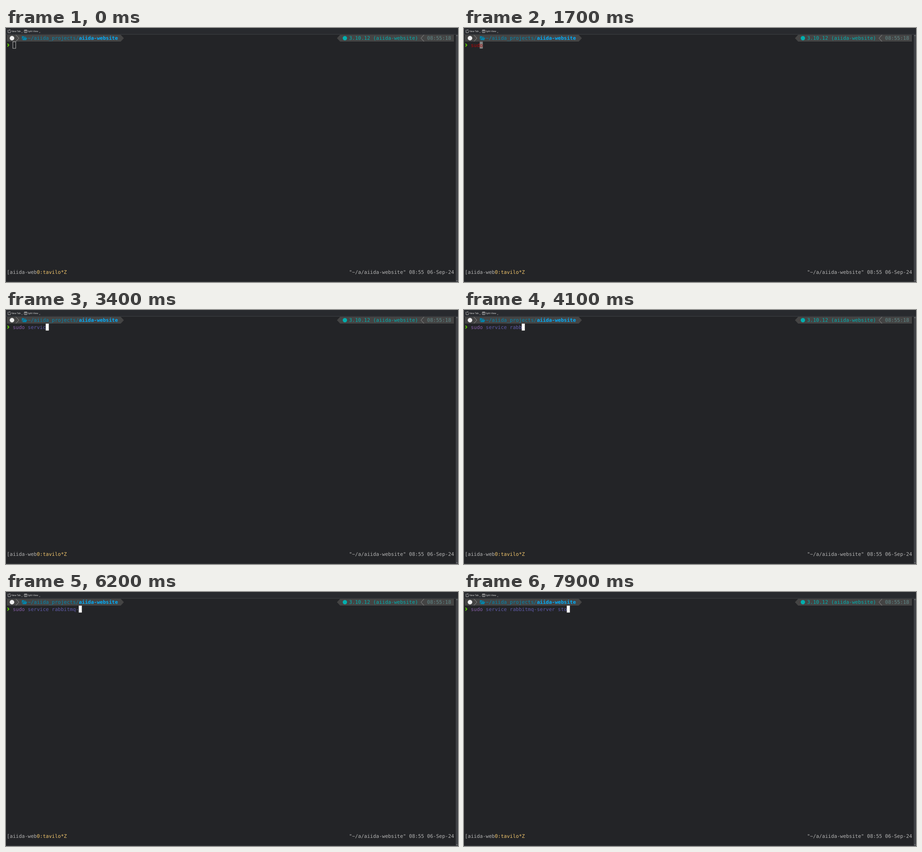
Animation, 997 px wide and 561 px high, one loop 8000 ms. Source, as an HTML page:

```html
<!DOCTYPE html>
<html lang="en">
<head>
<meta charset="utf-8">
<title>Terminal</title>
<style>
  html, body { margin: 0; width: 100%; height: 100%; overflow: hidden; background: #232427; }
  svg { display: block; width: 997px; height: 561px; }
  text { font: 11px "DejaVu Sans Mono", monospace; white-space: pre; text-rendering: geometricPrecision; }
  .menu { font: 5.1px "Noto Sans", sans-serif; fill: #dcdcdc; }
  .line { fill: none; stroke: #d0d0d0; stroke-width: .8; }
  .sep { fill: none; stroke: #949494; stroke-width: 1; }
</style>
</head>
<body>
<svg viewBox="0 0 997 561">
  <rect width="997" height="561" fill="#232427"/>

  <!-- toolbar -->
  <rect width="997" height="14" fill="#282a2e"/>
  <rect y="13.6" width="997" height=".9" fill="#424549"/>
  <path class="line" d="M6 4.4H4.4V10.4H9.6V6.4M7 4.4H9.6M8.3 3.2V5.8"/>
  <text class="menu" x="12" y="9.3">New Tab</text>
  <path class="line" stroke-width=".6" d="M34.3 9.6l1 .9 1-.9"/>
  <path class="line" d="M40.4 4.4H46.2V10.2H40.4ZM43.3 4.4V10.2M40.4 5.2H46.2"/>
  <text class="menu" x="48" y="9.3">Split View</text>
  <path class="line" stroke-width=".6" d="M73.3 9.6l1 .9 1-.9"/>

  <!-- scrollbar and lower edge -->
  <rect x="992" y="14.5" width="5" height="546.5" fill="#404246"/>
  <path class="line" d="M993.3 17.5l1.2-1.2 1.2 1.2M993.3 557.5l1.2 1.2 1.2-1.2"/>
  <rect y="560" width="992" height="1" fill="#393b3f"/>

  <!-- prompt bar -->
  <path fill="#444" d="M2 15H253L260 22.5 253 30H2ZM988 15H737L730 22.5 737 30H988Z"/>
  <circle cx="13.2" cy="22.5" r="5" fill="#eee"/>
  <path class="sep" d="M21.8 15.2L28.4 22.5 21.8 29.8M922 15.2L915.4 22.5 922 29.8"/>
  <path fill="#0087af" d="M35 26V18.2H39L40.2 19.5H44.2V21H37.4L35.8 25ZM36.3 26.8L38.3 21.8H46.8L44.6 26.8Z"/>
  <circle cx="747.5" cy="22.5" r="4.8" fill="#00afaf"/>

  <g id="labels"></g>

  <!-- command line -->
  <path d="M3.6 34.2Q4 36.2 6.2 37.7 4 39.2 3.6 41.3" fill="none" stroke="#5fd700" stroke-width="1.8"/>
  <rect id="cursor" y="30.5" height="14.5"/>
  <text y="41.6" x="15"><tspan id="cmd"></tspan><tspan id="args" fill="#5f5aa8"></tspan></text>
</svg>
<script>
const LOOP = 8000, CELL = 6.622, LEFT = 1.76;
const LINE = "sudo service rabbitmq-server sto";
// time at which each character of LINE shows up
const KEYS = [
  1200, 1400, 1600, 1700,
  2200, 2300, 2400, 2500, 2600, 2700, 3000, 3500,
  3600, 3600, 3700, 3900, 4100, 4300, 4500, 4900, 5300,
  6200, 6600, 6700, 6900, 7200, 7300, 7400,
  7600, 7700, 7800, 7900
];
const FOCUS = 500, VALID = 1800;

const $ = id => document.getElementById(id);
const col = n => LEFT + n * CELL;
const set = (el, attrs) => {
  for (const k in attrs) el.setAttribute(k, attrs[k]);
};

function label(column, y, text, fill, weight = "normal") {
  const el = document.createElementNS("http://www.w3.org/2000/svg", "text");
  set(el, { x: col(column), y, fill });
  el.style.fontWeight = weight;
  el.textContent = text;
  $("labels").append(el);
}

label(7, 26.2, "~/aiida_projects/", "#0087af");
label(24, 26.2, "aiida-website", "#00afff", "bold");
label(114, 26.2, "3.10.12 (aiida-website)", "#00afaf");
label(140, 26.2, "08:55:18", "#5f8787");
label(0, 543.2, "[aiida-web", "#b2b2b2");
label(10, 543.2, "0:tavilo*Z", "#efc46c");
label(114, 543.2, '"~/a/aiida-website" 08:55 06-Sep-24', "#b2b2b2");

function draw(t) {
  const typed = KEYS.filter(k => t >= k).length;
  const valid = t >= VALID;
  // the cursor lingers over the last letter until the command is recognised
  const lag = typed === 4 && !valid;
  const focused = t >= FOCUS;
  $("cmd").textContent = LINE.slice(0, Math.min(typed, 4));
  $("args").textContent = LINE.slice(4, typed);
  set($("cmd"), { fill: valid ? "#875fa8" : "#b00808" });
  set($("cursor"), {
    x: col(2 + typed - (lag ? 1 : 0)) + (focused ? -.2 : 0),
    width: focused ? 6.8 : 6.4,
    y: focused ? 30.2 : 30.5,
    height: focused ? 15.2 : 14.5,
    fill: !focused ? "none" : lag ? "#858585" : "#fcfcfc",
    stroke: focused ? "none" : "#c8c8c8",
    "stroke-width": .9
  });
}

const start = performance.now();
function tick() {
  draw((performance.now() - start) % LOOP);
  requestAnimationFrame(tick);
}
draw(0);
requestAnimationFrame(tick);
</script>
</body>
</html>
```
